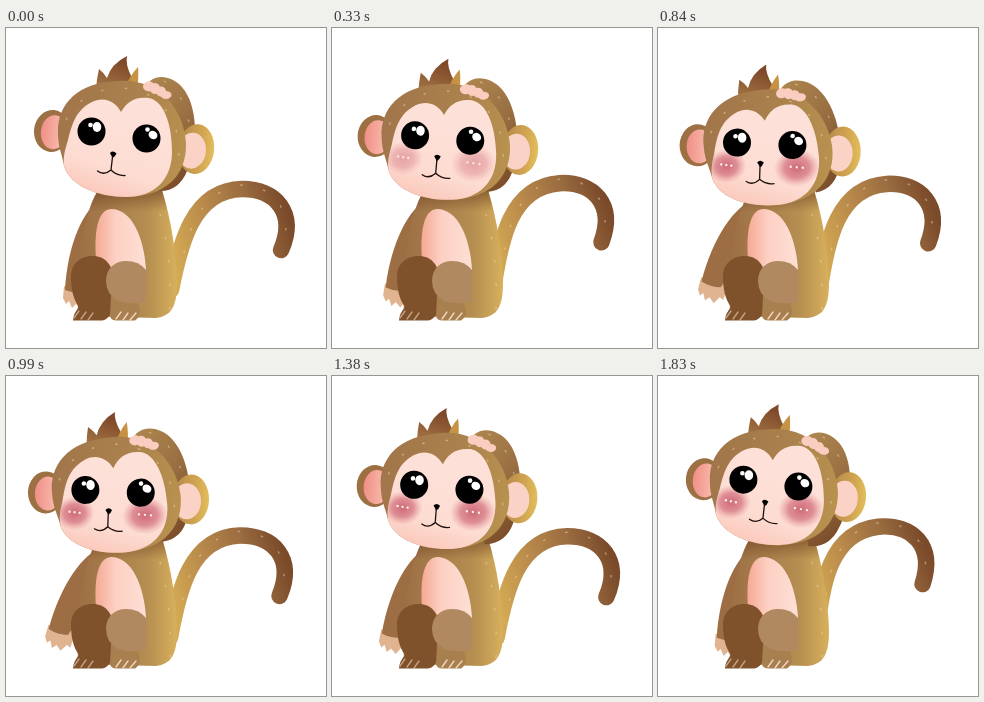
Animation of 320x320 px, one loop 1860 ms. Source, as an HTML page:

```html
<!DOCTYPE html>
<html lang="en">
<head>
<meta charset="utf-8">
<title>Shy monkey</title>
<style>
html, body { margin: 0; height: 100%; overflow: hidden; background: #fff; }
svg { display: block; width: 100vw; height: 100vh; }
.speck { fill: none; stroke: #f1d9a8; stroke-opacity: .5; stroke-width: 1.4; stroke-dasharray: 2.5 21; }
.line { fill: none; stroke: #1c0f0c; stroke-width: 1.3; stroke-linecap: round; }
.claw { fill: none; stroke: #f3d9c4; stroke-width: 1.3; stroke-linecap: round; }
</style>
</head>
<body>
<svg viewBox="0 0 320 320">
  <defs>
    <linearGradient id="tailFur" gradientUnits="userSpaceOnUse" x1="172" y1="240" x2="288" y2="205">
      <stop offset="0" stop-color="#d3a953"/><stop offset=".35" stop-color="#b98a4b"/>
      <stop offset=".7" stop-color="#9a6c40"/><stop offset="1" stop-color="#7a4a2a"/>
    </linearGradient>
    <linearGradient id="bodyFur">
      <stop offset="0" stop-color="#9d6f44"/><stop offset=".3" stop-color="#a67c4b"/>
      <stop offset=".7" stop-color="#b58e51"/><stop offset="1" stop-color="#d8b05c"/>
    </linearGradient>
    <linearGradient id="neckShade" x2="0" y2="1">
      <stop offset="0" stop-color="#6d4020" stop-opacity=".65"/><stop offset=".17" stop-color="#6d4020" stop-opacity="0"/>
    </linearGradient>
    <linearGradient id="headFur" x1="0" y1=".3" x2="1" y2=".5">
      <stop offset="0" stop-color="#a1754a"/><stop offset=".6" stop-color="#ab824d"/><stop offset="1" stop-color="#b8914f"/>
    </linearGradient>
    <linearGradient id="armFur" x1=".2" y1="0" x2=".6" y2="1">
      <stop offset="0" stop-color="#ad854e"/><stop offset=".5" stop-color="#9a7043"/><stop offset="1" stop-color="#7a4b28"/>
    </linearGradient>
    <linearGradient id="tuftFur" x1="0" y1="1" x2=".4" y2="0">
      <stop offset="0" stop-color="#a97c4a"/><stop offset=".4" stop-color="#98673c"/><stop offset="1" stop-color="#7e4829"/>
    </linearGradient>
    <linearGradient id="earFur">
      <stop offset="0" stop-color="#b5884a"/><stop offset=".6" stop-color="#cfa350"/><stop offset="1" stop-color="#e3be5c"/>
    </linearGradient>
    <linearGradient id="earSkin">
      <stop offset="0" stop-color="#f08f86"/><stop offset="1" stop-color="#fbc4b6"/>
    </linearGradient>
    <linearGradient id="bellySkin">
      <stop offset="0" stop-color="#f5a994"/><stop offset=".4" stop-color="#fdd0c3"/><stop offset="1" stop-color="#fddfd5"/>
    </linearGradient>
    <linearGradient id="faceSkin" x1=".1" y1="1" x2=".4" y2=".2">
      <stop offset="0" stop-color="#fac2b3"/><stop offset=".45" stop-color="#fddcd2"/><stop offset="1" stop-color="#fde0d8"/>
    </linearGradient>
    <radialGradient id="blushTone">
      <stop offset="0" stop-color="#c65a6c" stop-opacity=".88"/><stop offset=".55" stop-color="#cf6676" stop-opacity=".65"/>
      <stop offset="1" stop-color="#e08c90" stop-opacity="0"/>
    </radialGradient>
    <path id="torso" d="M91 164C78 186 70 230 72 288L150 290C165 288 171 279 171 255C170 225 166 195 156 162Z"/>
    <path id="face" d="M115 84C108 71 96 69 86 74C70 82 66 96 62 112C59 122 57 128 58 138C64 158 92 169 120 169C148 169 166 152 166 124C166 96 158 73 143 70C128 68 120 75 115 84Z"/>
    <clipPath id="faceClip"><use href="#face"/></clipPath>
  </defs>

  <g id="tail">
    <path d="M165 262C174 215 187 162 236 161C270 161 291 185 275 222" fill="none" stroke="url(#tailFur)" stroke-width="16.5" stroke-linecap="round"/>
    <path class="speck" d="M178 225C184 195 200 161 236 157C266 158 286 180 278 215"/>
  </g>

  <g id="leftArm">
    <path d="M58 258L57 270L60 276L63 273L66 280L70 276L75 281L80 274L84 276L86 258Z" fill="#e0b491"/>
    <path d="M96 170C77 182 62 215 59 262Q69 266 79 264C90 240 102 220 102 190Z" fill="#9d6d43"/>
  </g>

  <use href="#torso" fill="url(#bodyFur)"/>
  <use href="#torso" fill="url(#neckShade)"/>
  <path class="speck" d="M154 186Q166 228 164 282"/>
  <path d="M90 232C88 205 91 182 105 181C125 181 138 208 140 242L92 240Z" fill="url(#bellySkin)"/>
  <path d="M65 249C65 235 75 228 87 228C99 228 107 237 107 250L107 274Q106 291 96 292.500H67Q67 286 73 279C67 271 65 260 65 249Z" fill="#80522b"/>
  <path d="M105 268L104 288Q105 293 112 292.500H129Q137 287 132 276L128 266Z" fill="#a87f4f"/>
  <path d="M100 253C100 240 109 233 120 233Q133 233 140 242V274Q124 277 112 273Q100 266 100 253Z" fill="#b08960"/>
  <path class="claw" d="M68 290L73 283M75 291L80 284M82 292L87 285" stroke-opacity=".6"/>
  <path class="claw" d="M110 291L115 284M117 292L122 285M124 292L130 285"/>

  <g id="raisedArm">
    <path d="M137 66C141 44 166 44 179 63C193 84 191 122 181 143C176 156 166 164 152 163L138 100Z" fill="url(#armFur)"/>
    <path class="speck" d="M158 53Q182 66 185 112"/>
  </g>

  <g id="head">
    <g transform="rotate(6 46 103)">
      <ellipse cx="46" cy="103" rx="18" ry="21" fill="#9d7044"/>
      <ellipse cx="48" cy="104" rx="13" ry="17" fill="url(#earSkin)"/>
    </g>
    <g transform="rotate(6 189 122)">
      <ellipse cx="190" cy="121" rx="18" ry="25" fill="url(#earFur)"/>
      <ellipse cx="186" cy="123" rx="14" ry="18" fill="#fbd3c6"/>
    </g>
    <path d="M90 60Q91 49 93 41Q98 45 101 50Q105 36 121 28Q119 36 126 50L124 64Z" fill="url(#tuftFur)"/>
    <path d="M118 62Q124 47 132 39Q133 49 131 62Z" fill="#c59343"/>
    <path d="M52 105C51 76 72 54 112 53C154 50 178 82 180 115C181 147 160 169 120 169C92 169 64 158 58 138C56 125 52 120 52 105Z" fill="url(#headFur)"/>
    <path class="speck" d="M60 92Q76 62 112 60Q160 60 173 112V140"/>
    <use href="#face" fill="url(#faceSkin)"/>
    <g id="blush">
      <g clip-path="url(#faceClip)" fill="url(#blushTone)">
        <ellipse cx="73" cy="126" rx="20" ry="17"/>
        <ellipse cx="143" cy="133.500" rx="23" ry="19"/>
      </g>
      <path d="M68 124h0M73 125h0M78 126h0M137 132h0M143 133h0M149 134h0" stroke="#fff0ee" stroke-width="2.4" stroke-linecap="round"/>
    </g>
    <circle cx="85.500" cy="103.500" r="14"/>
    <circle cx="140.500" cy="110.500" r="14"/>
    <g fill="#fff">
      <ellipse cx="91" cy="99" rx="4.300" ry="5"/><circle cx="84.500" cy="97" r="2.300"/>
      <ellipse cx="147" cy="107" rx="4.600" ry="4" transform="rotate(35 147 107)"/><circle cx="141.500" cy="101.500" r="2.300"/>
    </g>
    <path d="M104 125Q107 122 110.500 125.500Q109 129 106.500 130Z"/>
    <path class="line" d="M106.500 129L105 142M91.500 143Q98 148 105 142Q111 148 119 147.500"/>
  </g>

  <g id="hand" fill="#f9cdbf">
    <ellipse cx="143" cy="58.500" rx="6" ry="5"/><ellipse cx="149" cy="60.500" rx="5" ry="5.500"/>
    <ellipse cx="155" cy="63.500" rx="5" ry="5"/><ellipse cx="160" cy="67" rx="5.500" ry="4"/>
  </g>
</svg>
<script>
const LOOP = 1860, STEP = 30;
const part = id => document.getElementById(id);
const [tail, leftArm, raisedArm, head, hand, blush] =
  ["tail", "leftArm", "raisedArm", "head", "hand", "blush"].map(part);

// Linear interpolation through [time, value] pairs
function track(keys, t) {
  const i = keys.findIndex(k => k[0] > t);
  if (i < 0) return keys[keys.length - 1][1];
  const [t0, a] = keys[i - 1], [t1, b] = keys[i];
  return a + (b - a) * (t - t0) / (t1 - t0);
}

// 0 to 1 and back, with softened ends
function swing(t, peak) {
  const p = t < peak ? t / peak : (LOOP - t) / (LOOP - peak);
  return (p + (1 - Math.cos(Math.PI * p)) / 2) / 2;
}

const tailLift = [[0, .12], [600, 1], [1200, -.15], [1830, 1]];
const scratchX = [[0, 0], [330, -9], [570, -16], [840, -19], [1170, -7], [1620, 5], [1830, 6]];
const scratchY = [[0, 0], [840, -1], [1170, 3], [1620, 7], [1830, 8]];

const turn = (el, deg, x, y, dy = 0) =>
  el.setAttribute("transform", `translate(0 ${dy}) rotate(${deg} ${x} ${y})`);

function draw() {
  const t = Math.floor(performance.now() % LOOP / STEP) * STEP;
  turn(tail, .7 - 5.7 * track(tailLift, t), 110, 335);
  turn(leftArm, 12 * swing(t, 950), 95, 178);
  turn(head, -4.8 * swing(t, 870), 217, 188);
  const deg = track(scratchX, t) / 78 * 180 / Math.PI;
  for (const el of [raisedArm, hand]) turn(el, deg, 165, 140, track(scratchY, t));
  blush.setAttribute("opacity", Math.min(1, t / 650));
  requestAnimationFrame(draw);
}
draw();
</script>
</body>
</html>
```
